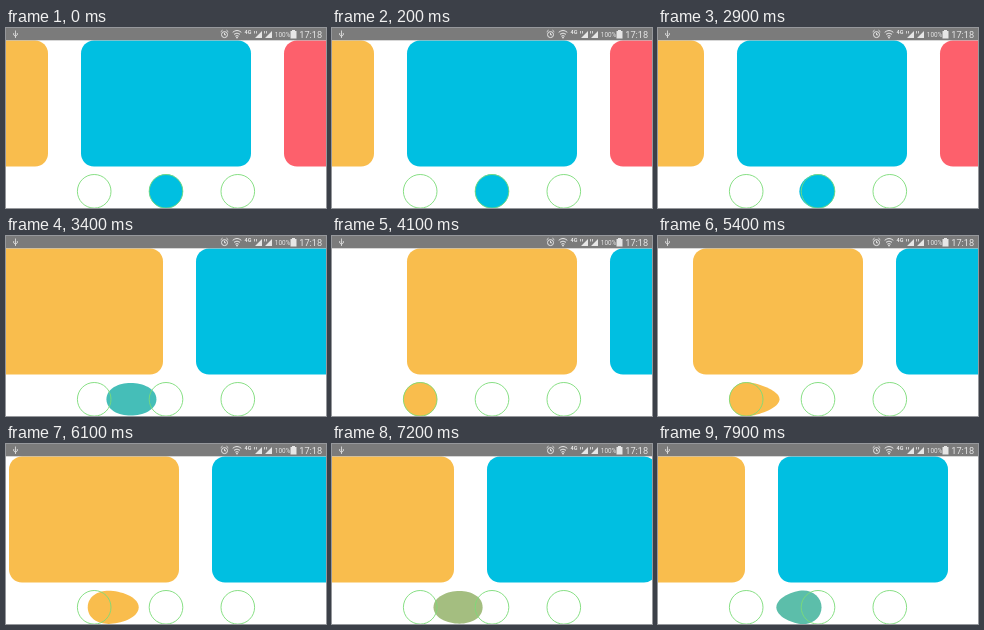
Recreate the animation shown at these times as an HTML page. Size 320x180 px, loop 8000 ms.

```html
<!DOCTYPE html>
<html lang="en">
<head>
<meta charset="utf-8">
<title>Card pager</title>
<style>
  html, body { margin: 0; width: 100%; height: 100%; overflow: hidden; background: #fff; }
  svg { display: block; width: 100vw; height: 100vh; }
  text { font-family: Roboto, Arial, sans-serif; fill: #e6e6e6; }
  .ring { fill: none; stroke: #7bdc78; stroke-width: .9; }
  .line { fill: none; stroke: #e6e6e6; }
  .solid { fill: #e6e6e6; }
</style>
</head>
<body>
<svg viewBox="0 0 320 180">
  <rect width="320" height="180" fill="#fff"/>
  <g id="cards">
    <rect x="-128" y="12.5" width="170" height="126" rx="13" fill="#f9bd4d"/>
    <rect x="75" y="12.5" width="170" height="126" rx="13" fill="#00bfe1"/>
    <rect x="278" y="12.5" width="170" height="126" rx="13" fill="#fd606c"/>
  </g>
  <path id="blob"/>
  <circle class="ring" cx="88.2" cy="163.3" r="16.8"/>
  <circle class="ring" cx="160" cy="163.3" r="16.8"/>
  <circle class="ring" cx="231.8" cy="163.3" r="16.8"/>

  <rect width="320" height="12.3" fill="#7b7b7b"/>
  <path class="line" stroke-width=".8" d="M9.5 2.5V10M7.7 5v2l1.8 1.3L11.3 7V5"/>
  <g class="line" stroke-width="1">
    <circle cx="218.5" cy="6.6" r="3"/>
    <path d="M218.5 4.8v2h1.5M214.7 3.8l1.8-1.6M222.3 3.8l-1.8-1.6"/>
    <path d="M226.7 4.3q4.3-3.6 8.6 0M228 6.3q3-2.4 6 0M229.3 8.2q1.7-1.2 3.4 0"/>
  </g>
  <circle class="solid" cx="231" cy="9.6" r=".9"/>
  <text x="238.6" y="6.2" font-size="5.4" font-weight="700">4G</text>
  <path class="solid" d="M256 3v7h-7zM266 3v7h-7z"/>
  <path class="line" stroke-width=".8" d="M248.5 3v2.5M250.5 3v2.5M258.5 3v2.5M260.5 3v2.5"/>
  <text x="268.8" y="9" font-size="6.4" textLength="auto">100%</text>
  <path class="solid" d="M286 2h3v1h1.5v7.5h-6V3H286z"/>
  <text x="293.3" y="10" font-size="9.2">17:18</text>
</svg>
<script>
const LOOP = 8000, STEP = 100, PITCH = 203, R = 17, CY = 163.3;
const YELLOW = [249, 189, 77], BLUE = [0, 191, 225];
const cards = document.getElementById('cards');
const blob = document.getElementById('blob');

// time in ms, scroll offset in px
const drag = [
  [0, 0], [2800, 0], [2900, 4], [3000, 12], [3200, 40], [3300, 70], [3400, 115],
  [3500, 155], [3600, 182], [3700, 197], [3800, 200.5], [3900, 202], [4100, 203],
  [4500, 203], [5400, 163], [6100, 131], [7200, 80], [7900, 45]
];

const lerp = (a, b, k) => a + (b - a) * k;
const ramp = (v, a, b) => Math.min(1, Math.max(0, (v - a) / (b - a)));

function offsetAt(t) {
  const i = drag.findIndex(p => p[0] > t);
  if (i < 0) return drag[drag.length - 1][1];
  const [t0, x0] = drag[i - 1], [t1, x1] = drag[i];
  return lerp(x0, x1, (t - t0) / (t1 - t0));
}

// Stretch ahead, slide across, then pull the tail in with a small bounce.
function blobPath(s, from, dir) {
  const q = s - .16 * s * s * (1 - s);
  const mid = ramp(q, .2, .5), late = ramp(q, .5, .8);
  const cx = from + dir * 71.8 * ramp(q, .2, .9);
  const front = 1 + ramp(q, 0, .2) - .5 * mid - .5 * late;
  const back = 1 + .5 * mid + .1 * late - .6 * ramp(q, .8, .9)
    - .2 * Math.sin(Math.PI * ramp(q, .9, 1));
  const bulge = mid - late;
  const h = R * (1 - .05 * bulge), m = R * .5523 * (1 + .35 * bulge);
  const v = Math.min(m, h * .66);
  const f = cx + dir * R * front, b = cx - dir * R * back;
  const ahead = cx + dir * m, behind = cx - dir * m;
  const top = CY - h, bottom = CY + h;
  return `M${cx} ${top}C${ahead} ${top} ${f} ${CY - v} ${f} ${CY}` +
    `C${f} ${CY + v} ${ahead} ${bottom} ${cx} ${bottom}` +
    `C${behind} ${bottom} ${b} ${CY + v} ${b} ${CY}` +
    `C${b} ${CY - v} ${behind} ${top} ${cx} ${top}Z`;
}

function draw(now) {
  const t = Math.floor(now % LOOP / STEP) * STEP;
  const x = offsetAt(t), toLeft = t < 4300;
  const s = toLeft ? x / PITCH : 1 - x / PITCH;
  const [c0, c1] = toLeft ? [BLUE, YELLOW] : [YELLOW, BLUE];
  const k = ramp(s, .4, 1);
  cards.setAttribute('transform', `translate(${x} 0)`);
  blob.setAttribute('d', blobPath(s, toLeft ? 160 : 88.2, toLeft ? -1 : 1));
  blob.setAttribute('fill', `rgb(${c0.map((c, i) => Math.round(lerp(c, c1[i], k)))})`);
}

const start = performance.now();
function tick() {
  draw(performance.now() - start);
  requestAnimationFrame(tick);
}
tick();
</script>
</body>
</html>
```
